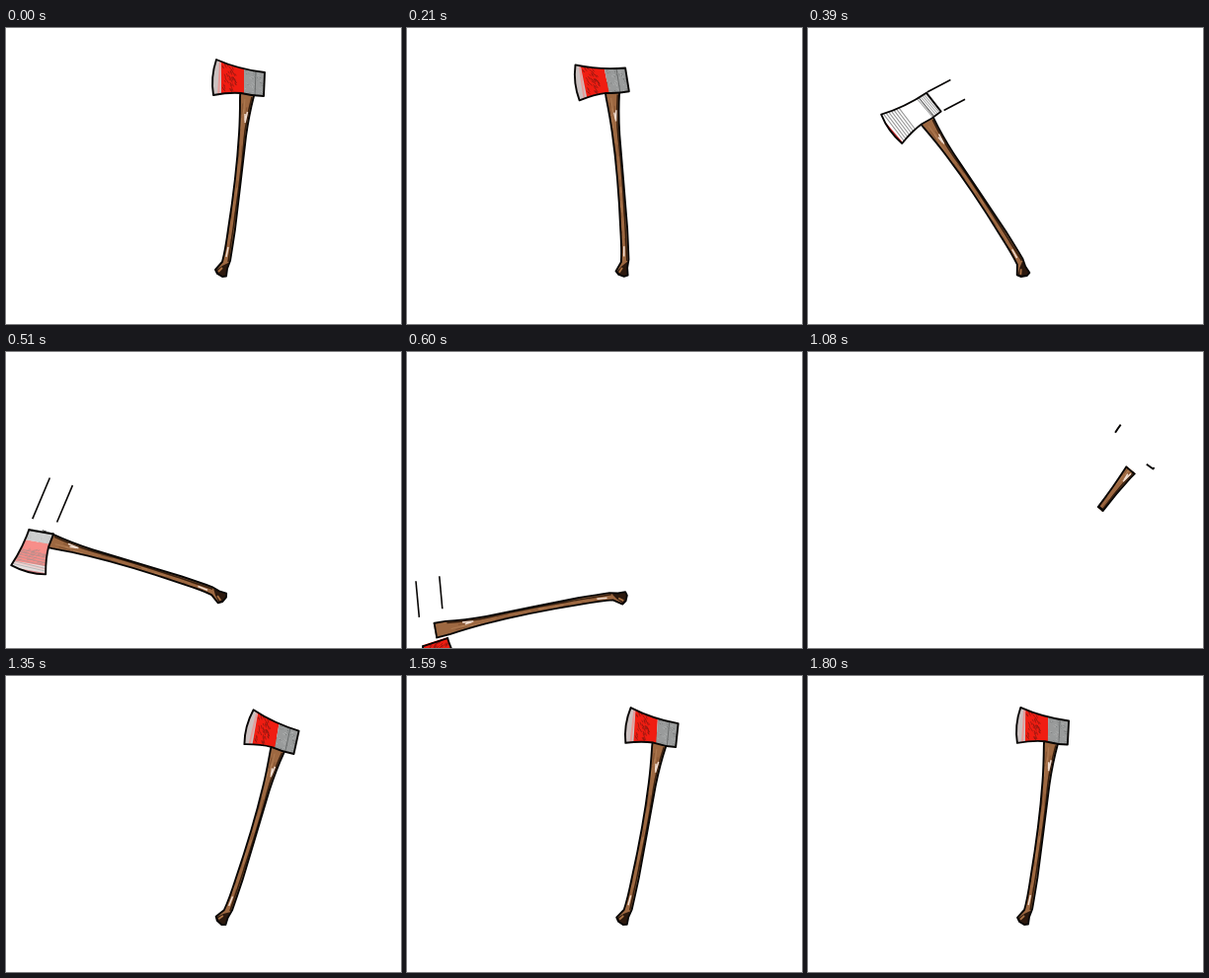
Write an HTML page with a canvas that moves like this. It is 400 px wide and 300 px high and loops after 1830 ms.

```html
<!DOCTYPE html>
<html lang="en">
<head>
<meta charset="utf-8">
<title>Axe swing</title>
<style>
html, body { margin: 0; width: 100%; height: 100%; overflow: hidden; background: #fff; }
canvas { display: block; width: 100%; height: 100%; }
</style>
</head>
<body>
<canvas id="stage" width="400" height="300"></canvas>
<script>
const ctx = document.getElementById('stage').getContext('2d');
const LOOP = 1830, STEP = 30;
const PIVOT = { x: 219, y: 248 };
const TILT = 8 * Math.PI / 180;
const INK = '#080605';

// Keys are [time, value] pairs.
const swing = [[0, 0], [240, 14], [390, 40.5], [540, 90], [600, 108], [960, 268],
  [1080, 328], [1350, 350], [1590, 356.4], [1800, 359.4], [1830, 360]];
const gripEnd = [[615, -12], [780, 62], [781, 145], [930, 145], [960, 138], [1080, 117], [1230, -12]];
const neckEnd = [[750, 194], [780, 145], [930, 145], [960, 152], [1080, 168], [1170, 194]];
const trail = [[300, 0], [390, 27], [540, 50], [600, 37], [690, 0]];
const glint = [[210, 0], [390, 1], [450, 1], [570, 0]];
const pollEdge = [[420, 270], [600, 235], [780, 235], [781, 270]];
const outlineGrow = [[1040, 0], [1080, 5], [1200, 100]];
const paint = [[1110, 0], [1230, 1]];

function linear(keys, t) {
  if (t <= keys[0][0]) return keys[0][1];
  for (let i = 1; i < keys.length; i++) {
    const [a, va] = keys[i - 1], [b, vb] = keys[i];
    if (t <= b) return va + (vb - va) * (t - a) / (b - a);
  }
  return keys[keys.length - 1][1];
}

function smooth(keys, t) {
  const slope = i => (keys[i + 1][1] - keys[i][1]) / (keys[i + 1][0] - keys[i][0]);
  const tangent = i => {
    if (i === 0) return 0;
    if (i === keys.length - 1) return slope(i - 1);
    const a = slope(i - 1), b = slope(i);
    return 2 * a * b / (a + b);
  };
  let i = 0;
  while (i < keys.length - 2 && t > keys[i + 1][0]) i++;
  const h = keys[i + 1][0] - keys[i][0], u = (t - keys[i][0]) / h;
  const u2 = u * u, u3 = u2 * u;
  return (2 * u3 - 3 * u2 + 1) * keys[i][1] + (u3 - 2 * u2 + u) * h * tangent(i)
    + (3 * u2 - 2 * u3) * keys[i + 1][1] + (u3 - u2) * h * tangent(i + 1);
}

function seeded(seed) {
  return () => (seed = (seed * 16807) % 2147483647) / 2147483647;
}

const handle = new Path2D(`M238 53 L237 70 Q237 92 236 107 C234 140 228 185 225 204
  Q222 226 219 237 L212 245 L214 249 L219 252 L223 251.5 L224 244 L227 236
  Q229 224 232 204 C235 178 240 137 243 110 Q246 88 251 69 L253 55 Z`);
const head = new Path2D(`M213 32 Q236 42 262 45 L261 69 Q250 69 238 66
  Q226 65 210 68 Q207 50 213 32 Z`);

function line(x1, y1, x2, y2, color, width) {
  ctx.strokeStyle = color;
  ctx.lineWidth = width;
  ctx.beginPath();
  ctx.moveTo(x1, y1);
  ctx.lineTo(x2, y2);
  ctx.stroke();
}

function box(color, x, y, w, h) {
  ctx.fillStyle = color;
  ctx.fillRect(x, y, w, h);
}

function outline(path) {
  ctx.strokeStyle = INK;
  ctx.lineWidth = 1.9;
  ctx.stroke(path);
}

function drawHandle(low, high) {
  if (high - low < 1) return;
  ctx.save();
  ctx.translate(PIVOT.x, PIVOT.y);
  ctx.rotate(TILT);
  ctx.beginPath();
  ctx.rect(-40, -high, 80, high - low);
  ctx.rotate(-TILT);
  ctx.translate(-PIVOT.x, -PIVOT.y);
  ctx.clip();

  ctx.save();
  ctx.clip(handle);
  box('#9d6841', 205, 45, 60, 215);
  const rnd = seeded(41);
  for (let i = 0; i < 38; i++) {
    const y = 72 + rnd() * 150, x = 243 - (y - 70) * 0.125 + (rnd() - 0.5) * 8;
    line(x, y, x - 1, y + 5 + rnd() * 9, rnd() < 0.6 ? '#75482b' : '#b8845a', 0.6);
  }
  ctx.strokeStyle = '#38200f';
  ctx.lineWidth = 1.5;
  ctx.stroke(new Path2D('M249 70 Q243 93 241 113 C239 142 233 182 230 204 L225 237'));
  ctx.strokeStyle = '#f1ddd0';
  ctx.stroke(new Path2D('M244.5 85 L242 96 M242 87 L242 94 M225 222 L223 232'));
  ctx.fillStyle = '#2c190e';
  ctx.fill(new Path2D('M219 241 L212 246 L218 253 L225 252 L225 238 Z'));
  line(215, 247, 219, 243, '#a87043', 1.8);
  ctx.translate(PIVOT.x, PIVOT.y);
  ctx.rotate(TILT);
  line(-20, -high, 20, -high, INK, 3.5);
  line(-20, -low, 20, -low, INK, 5);
  ctx.restore();

  outline(handle);
  ctx.restore();
}

function drawGlint(amount) {
  ctx.save();
  ctx.globalAlpha *= amount;
  box('#fff', 205, 28, 60, 45);
  box('#c3272b', 207, 28, 4.2, 45);
  for (let x = 213; x < 231; x += 2.7) line(x + 2, 34, x, 69, '#929292', 1);
  for (let x = 251; x < 262; x += 2) line(x, 42, x, 70, '#a5a5a5', 1);
  line(253, 42, 252, 70, '#444', 0.8);
  ctx.restore();
}

function paintHead(shine) {
  ctx.save();
  ctx.clip(head);
  box('#cbc1c0', 205, 28, 14, 45);
  box('#f01d12', 218, 28, 23, 45);
  box('#999b9b', 241, 28, 24, 45);
  line(217, 34, 215, 69, '#e69b98', 2);
  const rnd = seeded(77);
  for (let i = 0; i < 55; i++) {
    const x = 219 + rnd() * 13, y = 34 + rnd() * 33;
    line(x, y, x + 1.5, y + 2 + rnd() * 2, '#8b1710', 0.7);
  }
  for (let i = 0; i < 60; i++) {
    const x = 241 + rnd() * 20, y = 43 + rnd() * 25;
    line(x, y, x + 1, y + 1, rnd() < 0.5 ? '#6d7070' : '#b9bbbb', 0.7);
  }
  line(253, 44, 252, 69, '#626565', 0.8);
  if (shine > 0) drawGlint(shine);
  ctx.restore();
}

function drawPartialOutline(half) {
  for (const center of [78, 141]) {
    const from = Math.max(0, center - half);
    ctx.setLineDash([center + half - from, 400]);
    ctx.lineDashOffset = -from;
    outline(head);
  }
  ctx.setLineDash([]);
}

function drawHead(t) {
  if (t > 780 && t < 1050) return;
  if (t >= 1050 && t < 1230) {
    ctx.globalAlpha = linear(paint, t);
    paintHead(0);
    ctx.globalAlpha = 1;
    drawPartialOutline(linear(outlineGrow, t));
    return;
  }
  const edge = linear(pollEdge, t);
  ctx.save();
  ctx.beginPath();
  ctx.rect(200, 20, edge - 200, 60);
  ctx.clip();
  paintHead(linear(glint, t));
  if (edge < 262) {
    ctx.save();
    ctx.clip(head);
    line(edge - 1, 30, edge - 1, 72, INK, 2);
    ctx.restore();
  }
  outline(head);
  ctx.restore();
}

function drawTrail(length) {
  if (length <= 0) return;
  const dx = length * 0.97, dy = length * 0.22;
  line(263, 45, 263 + dx, 45 + dy, INK, 1.6);
  line(264, 70, 264 + dx * 0.9, 70 + dy * 0.9, INK, 1.6);
}

function draw(t) {
  ctx.setTransform(1, 0, 0, 1, 0, 0);
  box('#fff', 0, 0, 400, 300);
  ctx.lineJoin = 'round';
  ctx.translate(PIVOT.x, PIVOT.y);
  ctx.rotate(-smooth(swing, t) * Math.PI / 180);
  ctx.translate(-PIVOT.x, -PIVOT.y);
  if (t < 780 || t >= 960) drawHandle(linear(gripEnd, t), linear(neckEnd, t));
  drawHead(t);
  drawTrail(linear(trail, t));
}

const start = performance.now();
function tick() {
  const t = (performance.now() - start) % LOOP;
  draw(Math.floor(t / STEP) * STEP);
  requestAnimationFrame(tick);
}
tick();
</script>
</body>
</html>
```
